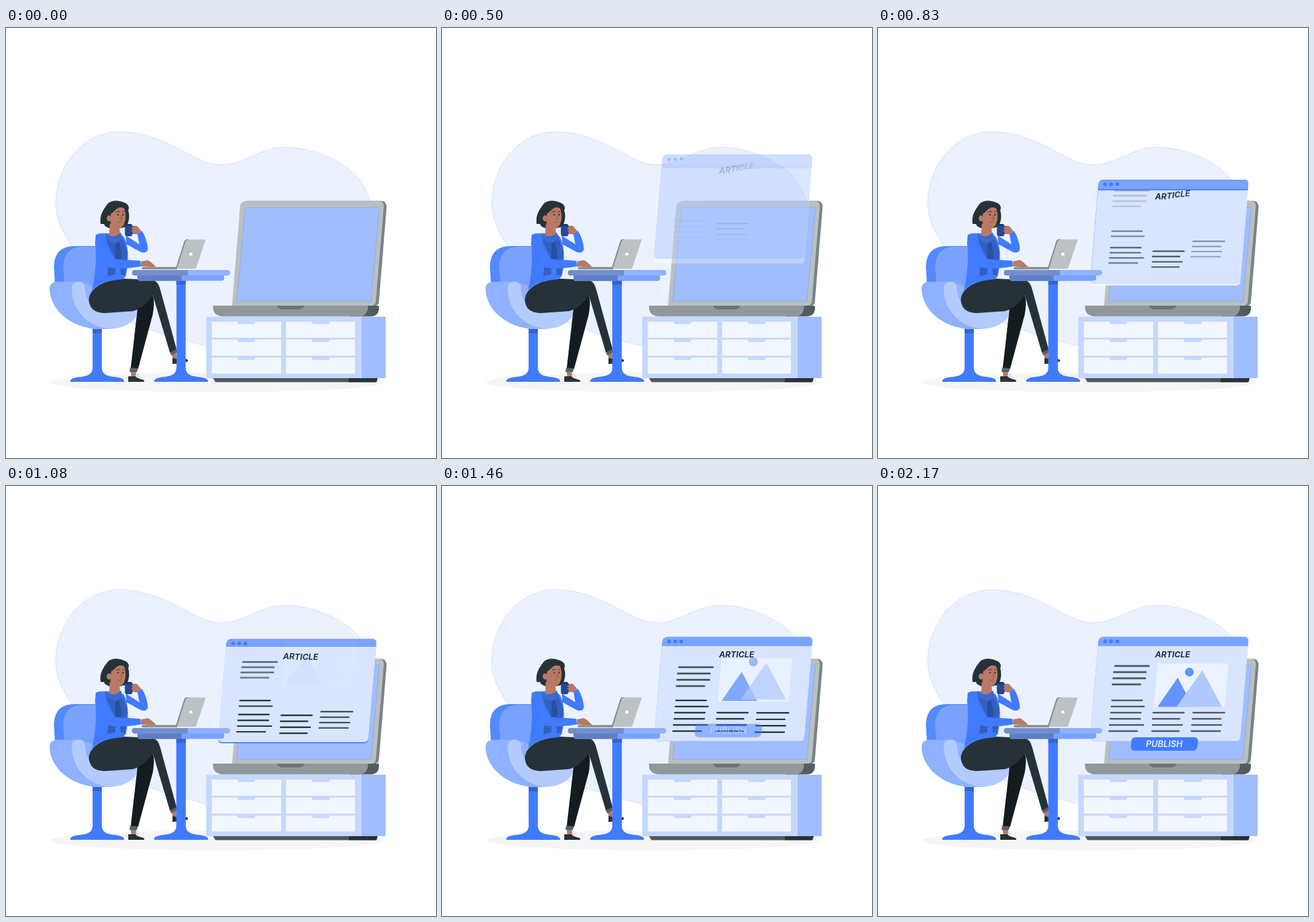
An HTML page with a canvas for the animation above (2210 ms loop, 700 px wide and 700 px high).

```html
<!DOCTYPE html>
<html>
<head>
<meta charset="utf-8">
<style>
html, body { margin: 0; width: 100%; height: 100%; overflow: hidden; background: #fff; }
canvas { display: block; width: 700px; height: 700px; }
</style>
</head>
<body>
<canvas id="stage" width="700" height="700"></canvas>
<script>
const canvas = document.getElementById('stage');
let ctx = canvas.getContext('2d');
const LOOP = 2210, DROP = 42;
const BLUE = '#407bff', DARK = '#263238', SKIN = '#b97964', SCARF = '#3360c0';

function fill(color, path) {
  ctx.fillStyle = color;
  ctx.fill(new Path2D(path));
}
function stroke(color, width, path) {
  ctx.strokeStyle = color;
  ctx.lineWidth = width;
  ctx.lineCap = 'round';
  ctx.stroke(new Path2D(path));
}
function box(color, x, y, w, h, r = 0) {
  ctx.fillStyle = color;
  ctx.beginPath();
  ctx.roundRect(x, y, w, h, r);
  ctx.fill();
}
function oval(color, x, y, rx, ry = rx) {
  ctx.fillStyle = color;
  ctx.beginPath();
  ctx.ellipse(x, y, rx, ry, 0, 0, 7);
  ctx.fill();
}

function drawBackdrop() {
  const blob = 'M183 169C230 168 270 190 305 209C338 227 360 226 390 213C412 204 428 194 456 194C495 194 545 215 568 238C584 254 597 285 605 320C620 440 560 540 430 535C390 532 355 527 326 518C290 508 255 500 215 484C160 465 135 400 107 355C92 332 81 312 81 283C83 222 125 170 183 169Z';
  fill('#ebf1ff', blob);
  stroke('#c9d9ff', 0.8, blob);
  oval('#f5f5f5', 343, 577, 271, 16);
}

function drawStand(x, top) {
  box(BLUE, x - 7.5, top, 15, 560 - top);
  box('#3464d0', x - 7.5, top, 15, top > 450 ? 10 : 7);
  ctx.save();
  ctx.translate(x, 0);
  fill(BLUE, 'M-44 576C-44 570 -36 569 -24 567.5C-14 566 -8 562 -7.5 554H7.5C8 562 14 566 24 567.5C36 569 44 570 44 576Z');
  ctx.restore();
}

function drawChair() {
  drawStand(148.5, 487);
  fill('#538aff', 'M80 420L78 390C78 366 90 355 112 355H148V420Z');
  fill('#79a2ff', 'M96 420L93 392C93 369 103 356 126 356H148L154 425Z');
  fill('#8fb1ff', 'M71 424C71 416 77 413 86 413H122L216 450C213 476 192 490 165 490H143C100 484 71 456 71 424Z');
  fill('#b3cbff', 'M107 425C107 416 112 413 118 413C126 413 129 418 129 427C131 446 142 461 160 461L217 456C212 478 195 489 168 489.5C130 486 107 456 107 425Z');
}

function drawPerson() {
  // far arm
  fill(BLUE, 'M195 338L217 352L214 335L221 330C228 340 231 354 231 360C230 366 224 367 218 364L196 352Z');
  // legs and shoes
  fill(SKIN, 'M203 558H212L211 569H204Z');
  fill(SKIN, 'M270 532L277 529L278 540H272Z');
  fill('#141c1f', 'M214 458L238 434C242 440 241 452 239 466L215 555L203 554Z');
  fill('#566166', 'M202 553L215 554L213 560L201 560Z');
  fill(DARK, 'M192 408C160 409 135 424 135 443C136 458 146 464 162 464L206 461C220 458 232 446 239 435L267 529L278 524L252 429C249 416 245 411 236 410Z');
  fill('#566166', 'M267 528L277 523L279 528L269 533Z');
  fill(DARK, 'M199 567L211 567C214 572 222 571 225 574V576H199Z');
  fill(DARK, 'M271 537L278 539L294 539Q297 540 296 543L282 546L271 547Z');
  stroke('#8fb1ff', 1, 'M211 565L215 562M213 567L217 566');
  // torso and scarf
  fill(BLUE, 'M146 337C151 333 160 335 168 334L190 338C201 350 200 385 195 404L190 409C165 411 148 417 140 427C146 402 148 372 145 350Z');
  fill(SCARF, 'M162 337L178 345V401L165 404L168 365Z');
  fill(SCARF, 'M182 346L190 342L198 365L194 402H187Z');
  fill('#28509f', 'M178 350L184 348L188 365L187 385L178 392Z');
  // head
  fill(DARK, 'M165 287C169 281 181 280 189 283C198 285 202 291 199 297C202 306 200 317 196 323C188 327 170 328 164 324C160 322 160 320 160 319L154 319C152 305 158 296 165 287Z');
  fill(SKIN, 'M169 318L168 336C172 341 181 340 186 335L184 322Z');
  fill(SKIN, 'M171 302C177 299 179 293 186 292L192 293C196 302 195 314 192 320C188 328 179 327 173 320L170 317Z');
  oval(SKIN, 168, 310, 4, 5);
  oval('#222', 182.5, 304, 1, 1.4);
  oval('#222', 190.5, 304, 1, 1.4);
  stroke(DARK, 0.9, 'M179 300Q182 297 185 299M189 299L192 299');
  stroke('#854e3d', 0.8, 'M187 305L189 311L186 311M182 316Q185 317 188 315');
  fill('#3a69d2', 'M162 334C171 342 180 340 187 333L190 342C185 351 170 351 162 342Z');
  // cup and hand
  fill(SKIN, 'M203 322L213 322L220 330L214 336L204 335Z');
  box('#28488f', 193.5, 319, 12.5, 20, 4);
  oval('#1c346c', 199.5, 320.5, 5.5, 1.6);
  stroke(SKIN, 2, 'M205 326L208 326M205 330L209 330');
  // near arm
  fill(BLUE, 'M146 338C154 333 160 338 164 349L178 376L219 379L220 388C196 392 174 393 163 388C152 380 148 362 146 350Z');
  stroke('#3464d0', 0.7, 'M163 352L177 376L196 378');
}

function drawTable() {
  drawStand(285, 411);
  box('#79a2ff', 214, 402, 141, 9.5, [0, 0, 4, 4]);
  box('#607fc6', 214, 402, 72, 9.5, [0, 0, 0, 4]);
  box('#8fb1ff', 205, 394, 160, 9, 4.5);
  box('#728ecc', 205, 394, 91, 9, [4.5, 0, 0, 4.5]);
  fill(SKIN, 'M220 380L231 378C236 380 241 386 244 389L236 389L220 388Z');
  box('#8e9395', 221, 389, 58, 4, 2);
  fill('#848a8d', 'M276 392L290 348Q291 344 295 344H298L282 392Z');
  fill('#bcc1c4', 'M278 392L292 348Q293 344.5 297 344.5H325L310 389Q309 392 306 392Z');
  oval('#fff', 301, 368, 2.6);
}

function drawCabinet() {
  fill('#4f595e', 'M337 570H605L603 576.5H341Z');
  fill(DARK, 'M558 570H605L603 576.5H558Z');
  box('#c6d7ff', 326, 470, 253, 100);
  box('#a0bdff', 579, 470, 39, 100);
  for (const [x, w] of [[335, 113], [456, 112]]) {
    for (let row = 0; row < 3; row++) {
      const y = 478 + row * 29.2;
      box('#f2f6ff', x, y, w, 26.2);
      box('#c6d7ff', x + 42, y - 1, 29, 5, [0, 0, 4, 4]);
    }
  }
}

function drawBigLaptop() {
  fill('#7a8386', 'M392 281.5H611Q620 282 619.5 292L607 446Q606 452 600 452H400Z');
  fill('#babfc2', 'M391 281.5H607Q616 282 615 291L602 446Q601 452 594 452H368L381 291Q382 282 391 281.5Z');
  fill('#a0bdff', 'M390 292H608L594 445H376Z');
  stroke('#8295bd', 0.5, 'M390 292H608L594 445H376Z');
  fill('#525c61', 'M560 452H607V459Q605 469.5 594 469.5H560Z');
  fill('#90989a', 'M337 452H589V458Q586 469.5 574 469.5H352Q338 468 337 456Z');
  fill('#6b7578', 'M441 452H486Q484 458 476 458H451Q443 458 441 452Z');
}

// Progress along an overshooting cubic-bezier(.36, -.01, .5, 1.38)
function ease(x) {
  if (x <= 0) return 0;
  if (x >= 1) return 1;
  const curve = (s, a, b) => 3 * (1 - s) * s * ((1 - s) * a + s * b) + s ** 3;
  let lo = 0, hi = 1;
  for (let i = 0; i < 24; i++) {
    const mid = (lo + hi) / 2;
    if (curve(mid, 0.36, 0.5) < x) lo = mid; else hi = mid;
  }
  return curve(lo, -0.01, 1.38);
}

function slide(p, opacity, draw) {
  ctx.save();
  ctx.translate(0, (p - 1) * DROP);
  ctx.globalAlpha *= Math.min(1, Math.max(0, p)) * opacity;
  draw();
  ctx.restore();
}

// Each column: first y, row pitch, [left, right] per row, time its ink lightens
const columns = [
  [369, 10, [[448, 498], [447, 491], [447, 495], [446, 490]], 1600],
  [369, 10, [[379, 428], [378, 427], [377, 432], [376, 422]], 1900],
  [349, 10, [[381, 430], [380, 433]], 1900],
  [369, 10, [[513, 564], [512, 558], [511, 559], [510, 557]], 1900],
  [293, 10, [[386, 441], [384, 436], [383, 435], [382, 427]], 0]
];

function drawLetters(t, enter) {
  ctx.font = 'italic 700 13.4px Inter, "Open Sans", sans-serif';
  const word = 'ARTICLE';
  const left = 479.5 - ctx.measureText(word).width / 2;
  [...word].forEach((letter, i) => enter(160 + 17 * i, 1, () => {
    ctx.fillStyle = DARK;
    ctx.fillText(letter, left + ctx.measureText(word.slice(0, i)).width, 278.5);
  }));
}

function drawWindow(t) {
  const enter = (start, opacity, draw) => slide(ease((t - start) / 1000), opacity, draw);
  const foot = 'L590 409Q589 415.5 583 415.5H352Q345 415 345.5 409';

  enter(145, 1, () => fill(BLUE, 'M367 245.5H597Q603 246 603 252' + foot + 'L358.5 254Q359 246 367 245.5Z'));
  enter(60, 0.8, () => fill('#fff', 'M358 260.5H602.5' + foot + 'Z'));
  enter(130, 0.3, () => fill('#fff', 'M367 245.5H597Q603 246 603 252L602.4 260.5H358L358.5 254Q359 246 367 245.5Z'));
  for (let i = 0; i < 3; i++) {
    enter(140 + i * 6, 1, () => oval(BLUE, 369.7 + i * 10, 253, 3));
  }
  drawLetters(t, enter);

  let start = 280;
  for (const [y, pitch, rows, lighten] of columns) {
    rows.forEach(([x1, x2], i) => {
      enter(start, t >= lighten ? 0.8 : 1, () =>
        stroke(DARK, lighten ? 2.4 : 3, `M${x1} ${y + i * pitch}H${x2}`));
      start += 19;
    });
  }

  enter(930, 0.5, () => fill('#fff', 'M455 289H570.5L564 360H449Z'));
  enter(945, 1, () => fill('#6394ff', 'M455 359.5L488 312L513 359.5Z'));
  enter(975, 1, () => fill('#b0c9ff', 'M486 359.5L528 300L560 359.5Z'));
  enter(1030, 1, () => oval('#6394ff', 506.8, 303, 7.2));

  enter(1085, 1, () => fill(BLUE, 'M419 409H515Q521 409 521 416L520 424Q519 431 512 431H417Q411 430 411.5 424L412.5 415Q413 409 419 409Z'));
  enter(1090, 1, () => {
    ctx.font = 'italic 700 14px Inter, "Open Sans", sans-serif';
    ctx.textAlign = 'center';
    ctx.fillStyle = '#d9e5ff';
    ctx.fillText('PUBLISH', 466, 425);
  });
}

// The room never changes, so it is painted once.
const room = document.createElement('canvas');
room.width = room.height = 700;
const screen = ctx;
ctx = room.getContext('2d');
ctx.fillStyle = '#fff';
ctx.fillRect(0, 0, 700, 700);
drawBackdrop();
drawCabinet();
drawBigLaptop();
drawChair();
drawPerson();
drawTable();
ctx = screen;

const table = document.createElement('canvas');
table.width = table.height = 700;
ctx = table.getContext('2d');
drawTable();
ctx = screen;

function render(t) {
  ctx.drawImage(room, 0, 0);
  if (t < 325) return;
  slide(ease(t / 1150), 1, () => drawWindow(t));
  ctx.drawImage(table, 0, 0);
}

const origin = performance.now();
function tick() {
  render((performance.now() - origin) % LOOP);
  requestAnimationFrame(tick);
}
tick();
</script>
</body>
</html>
```
